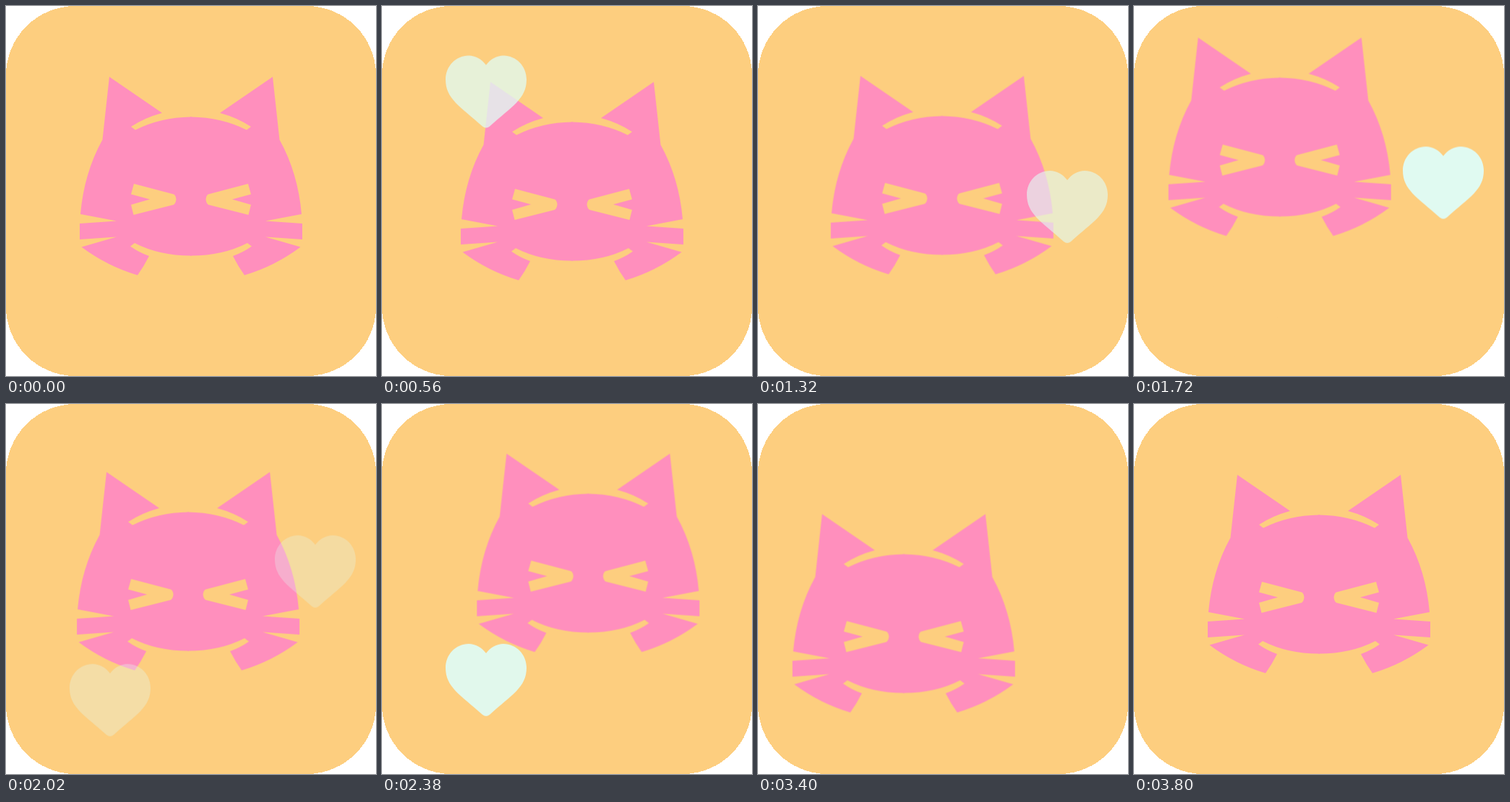
Write an HTML page that moves like this. It is 512 px wide and 512 px high and loops after 4.2 s.

```html
<!DOCTYPE html>
<html lang="en">
<head>
<meta charset="utf-8">
<title>Roaming cat</title>
<style>
  :root {
    --loop: 4200ms;
    --sand: #fdce7f;
    --pink: #ff8fbd;
    --mint: #e0fbf4;
  }
  html, body { margin: 0; width: 100%; height: 100%; overflow: hidden; background: #fff; }
  svg { display: block; width: 100vw; height: 100vh; }

  .card, .eye { fill: var(--sand); }
  .card { shape-rendering: crispEdges; }
  .cat {
    fill: var(--pink);
    animation: roam var(--loop) cubic-bezier(.1, 0, .61, 1) infinite;
  }
  .heart {
    fill: var(--mint);
    opacity: 0;
    animation: rise var(--loop) ease-out infinite, fade var(--loop) ease-in infinite;
  }
  .second { animation-delay: -3360ms; }
  .third { animation-name: rise-slow, fade-slow; animation-delay: -2520ms; }

  /* Out to each corner and back through the middle. */
  @keyframes roam {
    0%, 10%, 30%, 50%, 70%, 90%, 100% {
      transform: translate(0, 0);
      animation-timing-function: cubic-bezier(.58, 0, .89, 1);
    }
    20% { transform: translate(60px, 60px); }
    40% { transform: translate(-60px, -60px); }
    60% { transform: translate(60px, -60px); }
    80% { transform: translate(-60px, 60px); }
  }

  @keyframes rise {
    0% { transform: translateY(104px); }
    30%, 100% { transform: translateY(0); }
  }
  @keyframes fade {
    0% { opacity: 0; animation-timing-function: ease-in-out; }
    20% { opacity: 1; }
    30%, 100% { opacity: 0; }
  }
  @keyframes rise-slow {
    0% { transform: translateY(100px); }
    40%, 100% { transform: translateY(0); }
  }
  @keyframes fade-slow {
    0% { opacity: 0; animation-timing-function: ease-in-out; }
    20% { opacity: 1; }
    40%, 100% { opacity: 0; }
  }
</style>
</head>
<body>
<svg viewBox="0 0 512 512">
  <defs>
    <g id="half">
      <path d="M257 153.5H256Q214 154 179 171.5L173 167Q192 154.500 216 148L143 98L133.500 185
        Q108 231 103 288L153 297.500L102 301V323L153 319.500L104.500 333.500
        Q140 360 182 372.500Q191 360 198 346Q184 341 172 332.500L178 328Q212 345.500 256 345.500H257Z"/>
      <path class="eye" d="M177 246L232 260.500Q235 262 235.500 267.500Q235 273 232 275L176.500 289L173 275L199 267.500L173 260.500Z"/>
    </g>
    <path id="heart" d="M56 13C62 5 71 0 80 0C98 0 112 15 112 33C112 60 92 70 61 98
      Q56 102 51 98C20 70 0 60 0 33C0 15 14 0 32 0C41 0 50 5 56 13Z"/>
  </defs>

  <rect class="card" width="512" height="512" rx="96"/>
  <g class="cat">
    <use href="#half"/>
    <use href="#half" transform="matrix(-1 0 0 1 512 0)"/>
  </g>
  <g class="heart"><use href="#heart" x="88" y="29.500"/></g>
  <g class="heart second"><use href="#heart" x="372" y="181"/></g>
  <g class="heart third"><use href="#heart" x="88" y="291"/></g>
</svg>
</body>
</html>
```
